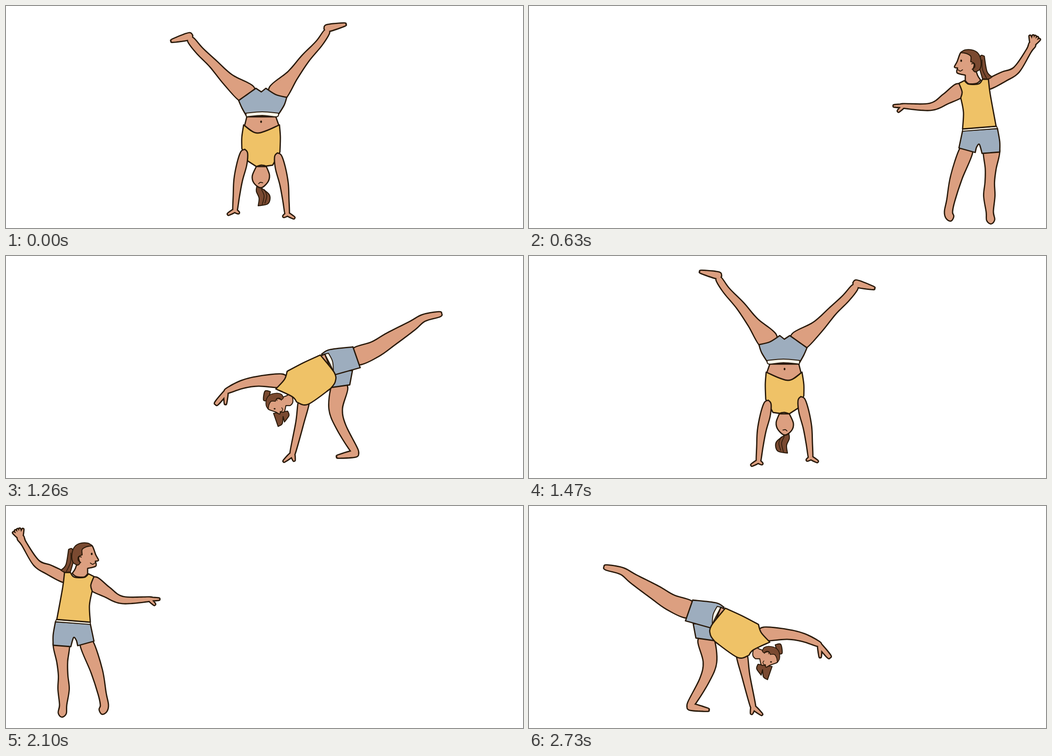
Recreate the animation shown at these times as an HTML page. Size 1140 by 491 pixels, loop 2940 ms.

```html
<!DOCTYPE html>
<html lang="en">
<head>
<meta charset="utf-8">
<title>Cartwheel</title>
<style>
  html, body { margin: 0; width: 100%; height: 100%; overflow: hidden; background: #fff; }
  svg { display: block; width: 100%; height: 100%; }
</style>
</head>
<body>
<svg id="stage" viewBox="0 0 1140 491" stroke="#28190a" stroke-linejoin="round" stroke-linecap="round"></svg>
<script>
const SKIN = '#dc9f80', SHIRT = '#efc267', SHORTS = '#9dadbe', HAIR = '#7a4a31', BAND = '#f9f6ea';
const LINE = 2.8;

const group = (transform, content) => `<g transform="${transform}">${content}</g>`;
const polar = (x, y, deg, r) => [x + r * Math.cos(deg * Math.PI / 180), y + r * Math.sin(deg * Math.PI / 180)];

function tuples(text, size) {
  const n = text.trim().split(/\s+/).map(Number);
  return Array.from({ length: n.length / size }, (_, i) => n.slice(i * size, i * size + size));
}

// Smooth spline through points, without the leading move.
function spline(p) {
  let d = '';
  for (let i = 0; i < p.length - 1; i++) {
    const a = p[i - 1] || p[i], b = p[i], c = p[i + 1], e = p[i + 2] || c;
    d += `C${b.map((v, k) => v + (c[k] - a[k]) / 6)} ${c.map((v, k) => v - (e[k] - b[k]) / 6)} ${c}`;
  }
  return d;
}

// "x y x y": a slash makes the point before it a sharp corner.
function curve(text) {
  const parts = text.split('/').map(part => tuples(part, 2));
  return 'M' + parts[0][0] + parts.map((p, i) => spline(i ? [parts[i - 1].at(-1), ...p] : p)).join('');
}
const shape = (fill, text, width = LINE) => `<path d="${curve(text)}Z" fill="${fill}" stroke-width="${width}"/>`;
const line = (text, width = 1.9) => `<path d="${curve(text)}" fill="none" stroke-width="${width}"/>`;
const dot = (x, y) => `<ellipse cx="${x}" cy="${y}" rx="2" ry="2.7" fill="#28190a" stroke="none"/>`;
const skin = text => shape(SKIN, text);
const hair = text => shape(HAIR, text, 2.2);
const shorts = text => shape(SHORTS, text);
const shirt = text => shape(SHIRT, text);
const band = text => shape(BAND, text, 2);

// Outline of a rounded tube through "x y radius" stations.
function tube(text) {
  const p = tuples(text, 3), last = p.length - 1, left = [], right = [];
  const along = p.map((_, i) => {
    const a = p[Math.max(i - 1, 0)], b = p[Math.min(i + 1, last)];
    return Math.atan2(b[1] - a[1], b[0] - a[0]);
  });
  p.forEach(([x, y, r], i) => {
    const dx = Math.cos(along[i]) * (r - LINE / 2), dy = Math.sin(along[i]) * (r - LINE / 2);
    if (i === 0) left.push([x - dx, y - dy]);
    left.push([x + dy, y - dx]);
    right.unshift([x - dy, y + dx]);
    if (i === last) left.push([x + dx, y + dy]);
  });
  const loop = [...left, ...right, left[0]];
  return 'M' + loop[0] + spline(loop) + 'Z';
}

// Tubes merged under one shared outline.
function limb(...parts) {
  const d = parts.join('/').split('/').map(tube).join('');
  return `<path d="${d}" fill="none" stroke-width="${LINE * 2}"/><path d="${d}" fill="${SKIN}" stroke="none"/>`;
}
const ray = (x, y, deg, length, r1, r2) => `${x} ${y} ${r1} ${polar(x, y, deg, length).join(' ')} ${r2}`;
const foot = (x, y, deg) => ray(x, y, deg, 37, 8, 4);
const hand = (x, y, deg, spread = 1) => [-58, -28, 0, 25, 60]
  .map(a => ray(x, y, deg + a * spread, 18, 5, 2.7)).join('/');

const head = transform => group(transform,
  skin('-5 -15 10 -25 20 -24 28 -4 34 8 27 10 / 28 21 10 26 / 10 38 / 2 45 -15 44 -24 37 / -17 26 -10 3')
  + hair('20 -24 10 -30 -8 -29 -20 -20 -25 -2 -22 13 -12 19 / -7 14 -10 1 -2 -4 / -2 -16 8 -22 20 -24')
  + line('-4 1 -10 0 -11 8 -5 13') + dot(19, -6) + line('16 14 21 17 26 14'));
const ponytail = transform => group(transform,
  hair('-32 -16 -24 -17 -20 3 -28 34 / -40 35 -49 30 / -38 18 -32 -16') + line('-27 -8 -28 13 -37 33', 1.5));

function handstand() {
  const arm = limb('525 325 8 520 350 11 512 385 9.5 508 420 7 505 452 5', '503 453 4 491 460 3', '506 453 4 512 457 3');
  return limb('532 195 22 490 163 14 457 128 10 428 100 9 408 76 8', foot(404, 67, 165))
    + limb('598 193 22 632 153 13 660 116 10 690 83 8 707 58 7', foot(709, 49, -12))
    + skin('531 245 / 526 265 / 560 290 / 602 265 / 595 245')
    + shorts('513 209 530 197 551 182 / 563 190 / 573 182 / 595 196 619 202 / 613 220 598 244 / 530 243 / 520 225 513 209')
    + band('529 237 565 234 601 237 / 597 245 565 242 530 245')
    + dot(562.5, 256)
    + hair('553 399 552 410 558 425 556 442 / 578 437 581 418 562 402')
    + line('563 405 569 420 565 439', 1.6) + line('570 406 575 420 571 436', 1.6)
    + skin('552 355 543 376 547 392 562 402 577 390 581 374 574 355')
    + line('557 393 561 390 566 391')
    + shirt('524 263 / 555 281 603 263 / 605 290 604 323 / 588 352 / 574 354 / 563 352 552 355 / 532 342 / 520 315 / 520 290 524 263')
    + arm + group('translate(1125 8) scale(-1 1)', arm);
}

function reach() {
  return limb('851 333 22 898 380 16 922 411 15 942 446 10', foot(949, 451, 160))
    + shorts('851 287 870 316 / 850 333 830 348 / 821 338')
    + limb('780 331 20 752 343 19 739 358 17 748 400 13 760 446 11', foot(768, 453, 164))
    + shorts('768 313 805 293 848 274 / 853 290 838 327 / 815 342 791 352 / 778 332 768 313')
    + band('795 297 / 835 263 / 840 274')
    + limb('716 261 9 680 281 10 645 300 10 612 306 7 602 303 8', hand(602, 303, 180))
    + ponytail('translate(708 219) scale(-.75 .65)')
    + head('translate(703 215) rotate(-41) scale(-.78 .78)')
    + shirt('709 253 722 242 735 236 748 222 / 780 210 / 810 228 837 262 / 805 285 769 312 / 745 285 720 268 / 709 253')
    + limb('767 215 13 735 195 11 690 182 9.5 650 180 9.5 617 180 7 607 179 7', hand(607, 179, 180))
}

function lunge() {
  return limb('755 176 10 715 147 10 685 124 9 671 104 7 669 90 6', '668 95 6 666 71 4', '672 92 5 675 82 3')
    + limb('860 315 19 895 347 15 929 370 12 976 424 9', foot(981, 429, 170))
    + limb('800 308 20 770 328 17 757 345 16 762 395 12 765 432 11', foot(769, 438, 176))
    + shorts('782 291 / 795 282 / 825 316 / 817 321')
    + shorts('788 272 820 268 851 248 / 876 295 / 860 315 842 328 / 815 303 788 272')
    + band('815 270 / 845 248 / 850 252')
    + ponytail('translate(769 132) scale(-1.2 1.2)')
    + head('translate(768 134) scale(-1 1)')
    + shirt('753 165 770 162 776 156 / 815 168 / 825 200 848 245 / 825 268 790 272 / 769 262 / 768 235 753 195 753 165')
    + limb('795 163 14 778 128 10 745 95 8 714 62 6', '710 60 6 700 43 7', '708 61 5 695 62 4');
}

const standing = (backArm, frontArm, frontLeg) => backArm
  + limb('122 303 18 124 345 12 126 375 10.5 127 405 12.5 126 440 8 124 458 9')
  + frontLeg
  + shorts('109 256 186 261 / 194 299 / 158 309 / 155 297 149 291 143 311 / 104 308 / 104 285 109 256')
  + band('111 251 / 186 257 / 186 262 / 109 256')
  + ponytail('translate(170 112)')
  + frontArm
  + head('translate(170 112)')
  + shirt('129 147 142 147 / 150 157 172 158 182 150 / 194 156 / 187 175 190 188 / 184 220 186 257 / 112 251 / 125 180 129 147');

const wave = () => standing(
  limb('130 159 11 95 141 11 67 126 8 40 84 6 32 70 8', hand(32, 70, -110, .6)),
  limb('192 171 16 222 190 12 257 208 8 318 206 5', '318 206 4 336 206 3', '318 208 4 327 217 3'),
  limb('178 305 15 200 365 13 212 415 9 217 440 9 214 452 9'));

const stepUp = () => group('translate(23 0)', standing(
  limb('130 165 11 135 110 9 149 34 7', hand(149, 34, -85, .5)),
  limb('192 172 14 214 120 10 229 35 7', hand(229, 35, -85, .5)),
  limb('178 305 16 222 350 15 226 385 12 220 425 9', '219 430 8 243 439 4')));

const tilted = (legMove, armMove) =>
  group(legMove, limb('352 229 20 312 213 18 278 191 16 230 161 11 205 144 8 171 136 6'))
  + limb('390 296 18 399 345 15 387 385 11 357 438 8', foot(356, 444, 10))
  + shorts('362 260 / 368 292 / 410 298 / 405 262')
  + shorts('361 208 412 214 430 224 / 402 270 / 345 254 / 361 208')
  + band('415 222 406 240 404 262 / 412 245 423 224')
  + skin('423 224 / 432 228 / 412 252')
  + limb('469 328 12 478 375 9 494 443 6', '494 446 5 491 458 3', '497 447 5 512 460 3')
  + group(armMove, limb('517 283 15 570 284 11 605 291 9 638 305 6', '640 307 5 661 332 5', '641 308 5 642 332 3'))
  + hair('543 307 555 306 558 326 548 326')
  + hair('505 350 502 360 512 374 / 515 362 / 517 378 526 384 / 536 355')
  + head('translate(529 330) rotate(90) scale(.78)')
  + shirt('433 226 470 243 506 262 / 512 280 531 301 / 495 318 485 330 / 460 335 410 300 / 400 285 402 265 433 226');

const enter = () => tilted('', '');
const land = () => tilted('translate(355 230) rotate(-8) scale(.93) translate(-355 -230)', 'rotate(20 515 280)');

// The first half travels left, the second is its mirror image; flipIn tells which half flips the drawing.
const pose = (draw, flipIn, sum, dy) => ({ art: draw(), flipIn, sum, dy });
const poses = [
  pose(handstand, 1, 1126, -6),
  pose(land, 0, 1126, 5),
  pose(reach, 1, 1126, -6),
  pose(wave, 0, 1142, 15),
  pose(stepUp, 0, 1146, 3),
  pose(lunge, 1, 1126, 6),
  pose(enter, 0, 1126, -7)
];
const HOLD = 210;
const stage = document.getElementById('stage');
const start = performance.now();
let shown = -1;

function tick() {
  const index = Math.floor((performance.now() - start) / HOLD) % (poses.length * 2);
  if (index !== shown) {
    shown = index;
    const { art, flipIn, sum, dy } = poses[index % poses.length];
    const flipped = Math.floor(index / poses.length) === flipIn;
    stage.innerHTML = group(flipped ? `translate(${sum} ${dy}) scale(-1 1)` : '', art);
  }
  requestAnimationFrame(tick);
}
tick();
</script>
</body>
</html>
```
